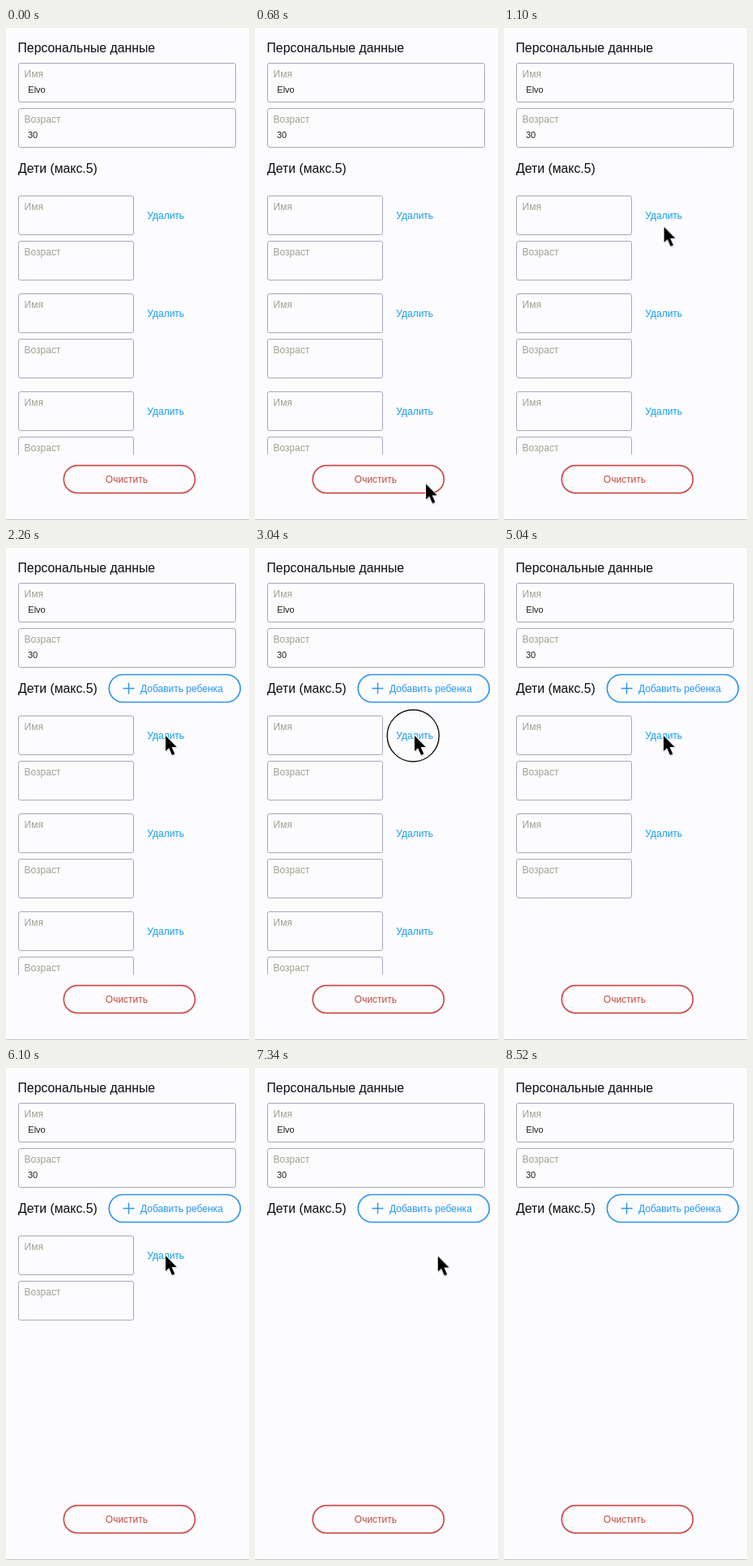
Recreate the animation shown at these times as an HTML page. Size 300 by 608 pixels, loop 8.56 s.

```html
<!DOCTYPE html>
<html lang="ru">
<head>
<meta charset="utf-8">
<title>Форма</title>
<style>
  html, body { margin: 0; width: 100%; height: 100%; overflow: hidden; background: #fcfcff; }
  svg { display: block; width: 300px; height: 608px; font-family: "Liberation Sans", Arial, sans-serif; }

  .title { font-size: 15.8px; fill: #0c0c10; }
  .label { font-size: 12px; fill: #a0a092; }
  .value { font-size: 11px; fill: #1c1c1c; }
  .link, .btn { font-size: 12px; }
  .link { fill: #149cee; }
  .field { fill: none; stroke: #a8a6bc; }
  .pill { fill: none; stroke-width: 1.7; }
  .add text { fill: #2595f2; }
  .add .pill, .add path { stroke: #2e93f2; }
  .clear text { fill: #c6483f; }
  .clear .pill { stroke: #cf4a48; }

  .add, .child, .press { animation: 8560ms step-end infinite; }
  .add { animation-name: show; }
  .c1 { animation-name: drop1; }
  .c2 { animation-name: drop2; }
  .c3 { animation-name: drop3; }
  .press { animation-name: press; }
  .cursor { animation: move 8560ms linear infinite; }

  @keyframes show  { 0% { opacity: 0 } 25.23%, 100% { opacity: 1 } }
  @keyframes drop3 { 0% { opacity: 1 } 48.48%, 100% { opacity: 0 } }
  @keyframes drop2 { 0% { opacity: 1 } 60.75%, 100% { opacity: 0 } }
  @keyframes drop1 { 0% { opacity: 1 } 73.25%, 100% { opacity: 0 } }

  /* ring is visible while the mouse button is held */
  @keyframes press {
    0%, 25.23%, 36.57%, 48.48%, 60.75%, 73.25%, 100% { opacity: 0 }
    23.83%, 35.05%, 47.08%, 59.23%, 71.85% { opacity: 1 }
  }
  @keyframes move {
    0%, 4.91% { transform: translate(213px, 610px); animation-timing-function: cubic-bezier(.65, 0, .35, 1) }
    14.72%, 82.94% { transform: translate(197px, 232px); animation-timing-function: cubic-bezier(.45, 0, .55, 1) }
    90.65%, 100% { transform: translate(304px, 234px) }
  }
</style>
</head>
<body>
<svg viewBox="0 0 300 608">
  <defs>
    <clipPath id="list"><rect y="195" width="300" height="332"/></clipPath>
    <g id="child">
      <rect class="field" x="15.5" y="207.5" width="142" height="48" rx="2.5"/>
      <text class="label" x="22.5" y="225">Имя</text>
      <rect class="field" x="15.5" y="263.5" width="142" height="48" rx="2.5"/>
      <text class="label" x="22.5" y="281">Возраст</text>
      <text class="link" x="174.3" y="235.5">Удалить</text>
    </g>
  </defs>

  <rect width="300" height="608" fill="#fcfcff"/>
  <rect y="607" width="300" height="1" fill="#c8c8cc"/>

  <text class="title" x="14.5" y="29.5">Персональные данные</text>
  <rect class="field" x="15.5" y="43.5" width="268" height="48" rx="2.5"/>
  <text class="label" x="22.5" y="61">Имя</text>
  <text class="value" x="27.3" y="79.5">Elvo</text>
  <rect class="field" x="15.5" y="99.5" width="268" height="48" rx="2.5"/>
  <text class="label" x="22.5" y="117">Возраст</text>
  <text class="value" x="27" y="136">30</text>

  <text class="title" x="15" y="179">Дети (макс.5)</text>
  <g class="add">
    <rect class="pill" x="127.3" y="156.5" width="162" height="34" rx="17"/>
    <path d="M144.5 173.5h14M151.5 166.5v14" stroke-width="1.4"/>
    <text class="btn" x="166" y="178">Добавить ребенка</text>
  </g>

  <g clip-path="url(#list)">
    <use class="child c1" href="#child"/>
    <use class="child c2" href="#child" y="121"/>
    <use class="child c3" href="#child" y="242"/>
  </g>

  <g class="clear">
    <rect class="pill" x="71.3" y="540.7" width="162" height="34" rx="17"/>
    <text class="btn" x="122.8" y="562">Очистить</text>
  </g>

  <circle class="press" cx="195.2" cy="232" r="32" fill="none" stroke="#111" stroke-width="1.4"/>
  <g class="cursor">
    <path d="M1 2V21L5.2 17L9 26L12.4 24.6L8.6 15.8H15Z" fill="#8f8fc0" opacity=".3"/>
    <path d="M0 0V19L4.2 15.2L8 24L11.4 22.6L7.6 14H13.8Z" fill="#000" stroke="#fff" stroke-width="1.6" stroke-linejoin="round" paint-order="stroke"/>
  </g>
</svg>
</body>
</html>
```
